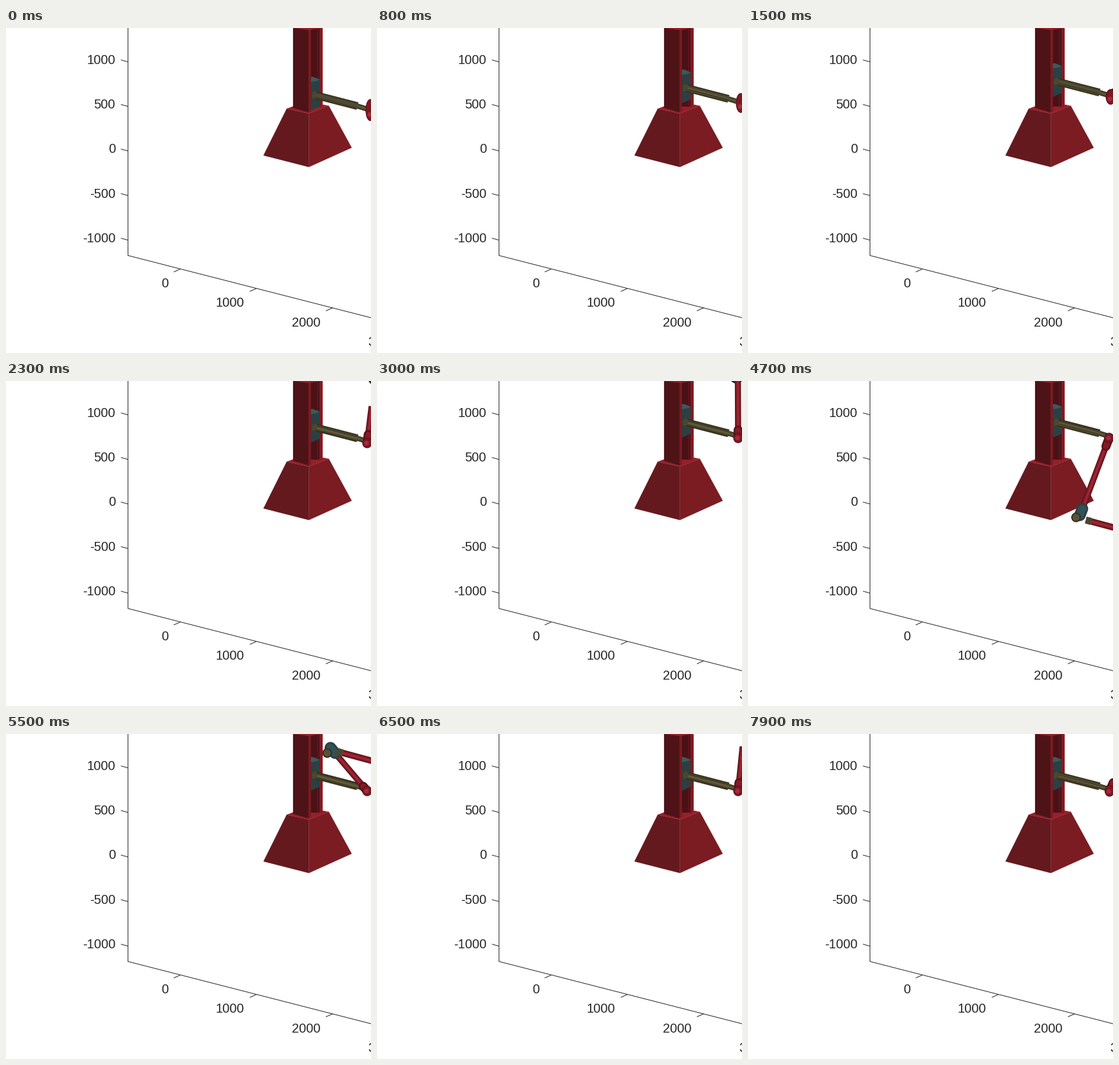
These frames come from a looping animation (567x505 px, 8000 ms). A matplotlib script:

```python
import numpy as np
import matplotlib.pyplot as plt
from matplotlib.animation import FuncAnimation
from matplotlib.patches import Circle, Ellipse, Polygon

W, H, DPI = 567, 505, 100
FRAMES, STEP = 80, 100
PX = 72 / DPI
INK = "#262626"
RED, RED_DARK, RED_LIGHT = "#861a25", "#56121a", "#a3283a"
OLIVE, OLIVE_DARK, OLIVE_LIGHT = "#4b462d", "#333020", "#625b3a"
TEAL, TEAL_DARK, TEAL_LIGHT = "#2f5158", "#2b4043", "#3b5a5d"

# screen vectors of the model axes, per 1000 units
EX, EY, EZ = np.array([118, 30]), np.array([113, -50]), np.array([0, -138])
ARM = 0.81

fig = plt.figure(figsize=(W / DPI, H / DPI), dpi=DPI, facecolor="white")
ax = fig.add_axes([0, 0, 1, 1])
ax.set_xlim(0, W)
ax.set_ylim(H, 0)
ax.axis("off")


def line(pts, color=INK, width=1, z=1, cap="butt"):
    x, y = np.transpose(pts)
    return ax.plot(x, y, color=color, lw=width * PX, zorder=z,
                   solid_capstyle=cap)[0]


def poly(pts, color, z=2):
    return ax.add_patch(Polygon(pts, closed=True, fc=color, ec=color,
                                lw=0.2, zorder=z))


def disc(r, color, z):
    return ax.add_patch(Circle((0, 0), r, fc=color, ec="none", zorder=z))


def label(text, x, y):
    ax.text(x, y, text, ha="right", va="baseline", color=INK,
            family="Liberation Sans", size=20 * PX)


def tube(width, z, dark, mid, light):
    """Shaded cylinder as three stacked strokes."""
    return [line([(0, 0), (0, 0)], c, width * k, z + i * 0.01)
            for i, (c, k) in enumerate([(dark, 1), (mid, 0.72), (light, 0.22)])]


def put(strokes, a, b):
    for s in strokes:
        s.set_data([a[0], b[0]], [a[1], b[1]])


def draw_axes():
    line([(189.5, 0), (189.5, 353.5), (567, 450.2)])
    for i in range(5):
        y = 52.6 + 69.25 * i
        line([(189.5, y), (178.5, y - 3)])
        label(str(1000 - 500 * i), 170, 56 + 69.25 * i)
    for i in range(4):
        x, y = 271 + 118.2 * i, 374.4 + 30.2 * i
        line([(x, y), (x - 10.5, y + 4.7)])
        label(str(1000 * i), 252.3 + 118.1 * i, 403 + 30.3 * i)


def draw_stand():
    poly([(400, 198), (436, 125.5), (470.5, 133), (470.5, 216)], "#64191e")
    poly([(470.5, 133), (501.5, 121), (537, 186), (470.5, 216)], "#7a1c22")
    poly([(436, 125.5), (467, 114), (501.5, 121), (470.5, 133)], "#96202a")
    poly([(446, 0), (470, 0), (470, 131), (446, 124)], "#4d1317")
    poly([(473, 0), (487, 0), (487, 122), (473, 122)], "#4a1116")
    poly([(483.5, 0), (484.5, 0), (484.5, 122), (483.5, 120)], "#681820")
    poly([(487, 0), (491.3, 0), (491.3, 121.5), (487, 123)], "#7d1c23")
    line([(490.8, 0), (490.8, 121)], "#98222c", 1, 3)
    poly([(470, 0), (473.6, 0), (473.6, 129.5), (470, 131)], "#7a1b22", 4)
    poly([(446, 0), (491, 0), (470, 3)], "#96202a", 4)


draw_axes()
draw_stand()

block = poly([(0, 0)] * 3, TEAL_DARK, 3.2)
block_top = poly([(0, 0)] * 3, TEAL_LIGHT, 3.3)
rod = tube(12, 5, OLIVE_DARK, OLIVE, OLIVE_LIGHT)
neck = tube(8, 4.9, OLIVE_DARK, OLIVE, OLIVE_LIGHT)
ribs = [line([(0, 0), (0, 0)], OLIVE_DARK, 0.8, 5.1) for _ in range(2)]
cap = ax.add_patch(Ellipse((0, 0), 8, 12, angle=14, fc=OLIVE, zorder=5.2))

arm = tube(9.5, 6, RED_DARK, RED, RED_LIGHT)
fork = line([(0, 0), (0, 0)], RED_DARK, 14, 6.1, "round")
fork_in = line([(0, 0), (0, 0)], RED, 9, 6.2, "round")
hub = ax.add_patch(Ellipse((0, 0), 14, 14, fc="#7c1822", ec=RED_DARK,
                           lw=0.8, zorder=6.3))
pin = disc(3.6, "#a62a3d", 6.4)
joint = line([(0, 0), (0, 0)], TEAL_DARK, 18, 6.5, "round")
joint_in = line([(0, 0), (0, 0)], TEAL, 12, 6.6, "round")
knob = disc(7.5, OLIVE_DARK, 6.7)
knob_in = disc(5.5, "#5a5236", 6.8)
collar = line([(0, 0), (0, 0)], OLIVE, 11, 6.85)
forearm = tube(10, 6.9, RED_DARK, RED, RED_LIGHT)
tool = disc(11, "#2a2a2c", 5.9)

TIMES = [0, 1500, 2300, 2850, 3200, 3900, 4700, 5500, 6200, 7200, 7900]
ANGLES = [0, 35, 81, 98, 80, -8, -119, -233, -266, -304, -305]


def update(i):
    t = i * STEP
    top = max(76 - 0.014 * t, 36)
    phi = np.radians(np.interp(t, TIMES, ANGLES))
    c, s = np.cos(phi), np.sin(phi)
    sweep = np.sin(np.pi * np.clip((t - 4700) / 800, 0, 1))

    block.set_xy([(473, top), (477, top), (487, top + 4), (487, top + 46),
                  (473.6, min(top + 52, 129))])
    block_top.set_xy([(473, top), (477, top), (487, top + 4),
                      (483, top + 6), (473, top + 8)])

    start = np.array([479, top + 28.0])
    end = start + [67, 17.3]
    put(rod, start, end)
    put(neck, end, end + [16, 5])
    for k, rib in enumerate(ribs):
        # ribs slide around the rod as it rolls
        off = np.array([0, 4 * np.sin(phi + 2.4 * k)])
        rib.set_data(*np.transpose([start + off, end + off]))
    cap.center = start

    facing = max(c, 0) ** 4
    pivot = np.array([561 + 5 * facing, top + 52.5 - facing])
    reach = c * EY + s * EZ
    elbow = pivot + ARM * reach + 0.13 * sweep * EX
    put(arm, pivot, elbow)
    for f in (fork, fork_in):
        put([f], pivot, pivot + 0.09 * reach)
    hub.center = pivot
    hub.height = 15 + 18 * facing
    pin.center = pivot + [-1, 7 * facing]

    unit = reach / np.hypot(*reach)
    for j in (joint, joint_in):
        put([j], elbow - 8 * unit, elbow + 3 * unit)
    knob.center = knob_in.center = elbow + [-7, 6]
    base = elbow + [17, 9 - 4 * s]
    slope = np.array([1, 0.27 + 0.35 * sweep])
    put([collar], base - 9 * slope, base)
    put(forearm, base, base + 200 * slope)
    tool.center = elbow + [-2, 16]
    tool.set_visible(t < 3500)
    return []


anim = FuncAnimation(fig, update, frames=FRAMES, interval=STEP,
                     init_func=lambda: update(0), repeat=True,
                     repeat_delay=0, blit=False)
plt.show()
```
